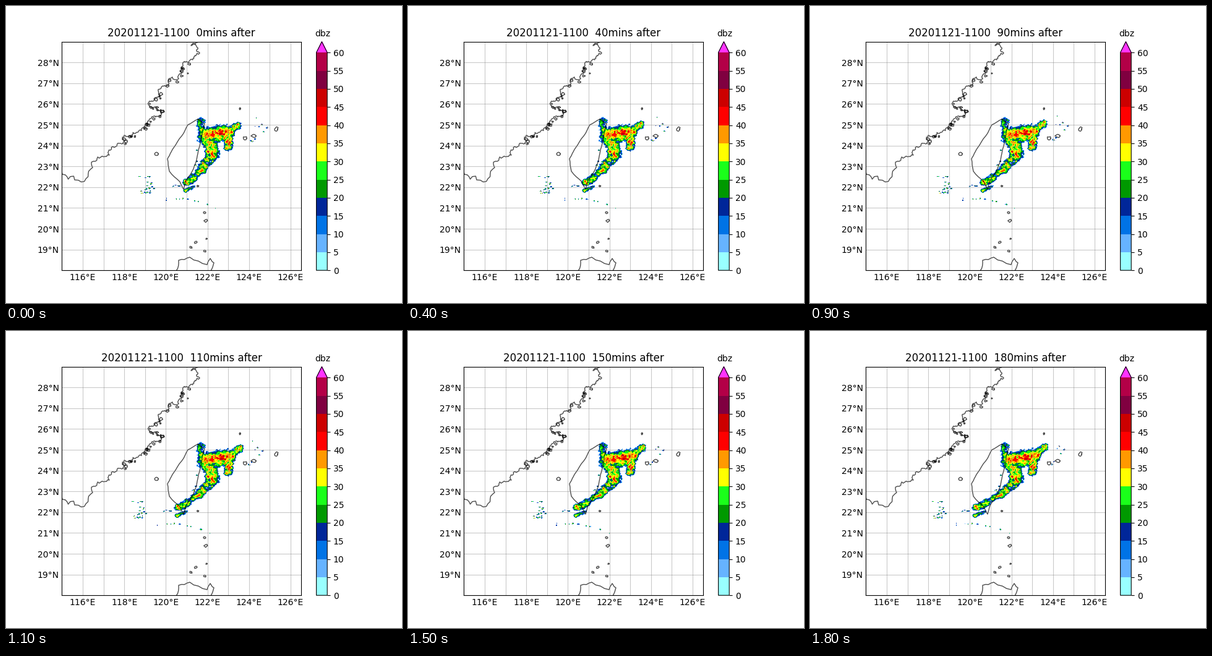
A matplotlib script that plays this animation: 640 by 480 pixels, repeating every 1.9 s.

```python
import numpy as np
import matplotlib.pyplot as plt
from matplotlib.animation import FuncAnimation
from matplotlib.cm import ScalarMappable
from matplotlib.colors import BoundaryNorm, ListedColormap

STEPS = 19
LEFT, RIGHT, TOP, BOTTOM, DEG = 90.4, 476.8, 57.6, 427.2, 33.6
X0, Y0, W, H = 180, 150, 270, 180
LEVELS = list(range(0, 61, 5))
COLORS = ["#99ffff", "#66b3ff", "#0073e6", "#002699", "#009900", "#1aff1a",
          "#ffff00", "#ff9900", "#ff0000", "#cc0000", "#800040", "#b30047"]

plt.rcParams["font.family"] = "DejaVu Sans"
rng = np.random.default_rng(11)

# Key points of the coasts, in stage pixels
MAINLAND = [(90, 267), (140, 261), (167, 241), (187, 223), (191, 209),
            (213, 204), (229, 186), (251, 176), (243, 163), (231, 155),
            (248, 147), (246, 135), (262, 123), (283, 100), (299, 86),
            (313, 76), (299, 64), (313, 57)]
MAIN_ISLAND = [(310, 183), (294, 192), (284, 210), (271, 229), (264, 242),
               (261, 247), (264, 267), (281, 284), (287, 296), (291, 282),
               (303, 263), (309, 243), (314, 222), (317, 203), (321, 190),
               (310, 183)]
SOUTH = [(275, 428), (279, 411), (297, 406), (325, 418), (330, 408),
         (336, 415), (331, 428)]
# x, y, radius
ISLANDS = [(310, 291, 1.5), (243, 239, 2.8), (321, 334, 2), (323, 347, 2.8),
           (324, 376, 1.2), (307, 382, 2.5), (299, 390, 2), (321, 396, 2.3),
           (386, 214, 3.3), (400, 210, 3.5), (437, 199, 3.3), (378, 166, 1.5),
           (294, 109, 1), (296, 94, 2)]

# Rain bands: x1, y1, x2, y2, half width, strength
BANDS = [(315, 187, 315, 214, 8, 22), (323, 209, 356, 205, 15, 36),
         (327, 207, 352, 207, 6, 41), (354, 202, 375, 194, 7, 29),
         (361, 202, 359, 229, 8, 32), (329, 224, 335, 240, 12, 33),
         (333, 240, 318, 262, 10, 28), (317, 262, 300, 281, 7, 24),
         (304, 279, 292, 285, 7, 30), (302, 293, 290, 298, 4, 23)]
# Loose specks: x, y, spread x, spread y, count
SPECKS = [(233, 292, 4, 4, 14), (222, 301, 5, 1.5, 6), (226, 275, 4, 1.5, 4),
          (275, 291, 4, 1, 6), (272, 312, 10, 1, 6), (335, 315, 16, 6, 4),
          (401, 216, 3, 1.5, 4), (407, 190, 3, 4, 4), (421, 205, 3, 6, 3),
          (309, 251, 3, 8, 5)]


def lon_x(lon):
    return LEFT + DEG * (lon - 115)


def lat_y(lat):
    return BOTTOM - DEG * (lat - 18)


def roughen(points, amount, depth):
    """Break each segment by pushing its middle sideways."""
    pts = np.array(points, float)
    for _ in range(depth):
        step = np.diff(pts, axis=0)
        side = step[:, ::-1] * (-1, 1)
        push = rng.uniform(-amount, amount, (len(step), 1))
        out = np.empty((2 * len(pts) - 1, 2))
        out[::2] = pts
        out[1::2] = pts[:-1] + step / 2 + side * push
        pts = out
    return pts


def islet(x, y, radius):
    a = np.linspace(0, 2 * np.pi, 9)
    r = radius * rng.uniform(0.5, 1.2, 9)
    r[-1] = r[0]
    return np.column_stack([x + r * np.cos(a), y + r * np.sin(a)])


def make_coasts():
    main = roughen(MAINLAND, 0.38, 4)
    lines = [main, roughen(MAIN_ISLAND, 0.04, 2), roughen(SOUTH, 0.1, 2)]
    lines += [islet(*i) for i in ISLANDS]
    # Skerries just off the northern half of the mainland
    for x, y in main[rng.integers(50, 210, 34)]:
        lines.append(islet(x + rng.uniform(0, 4), y + rng.uniform(0, 4),
                           rng.uniform(1, 3)))
    return lines


xx, yy = np.meshgrid(X0 + 0.5 + np.arange(W), Y0 + 0.5 + np.arange(H))


def noise(cell):
    """Smooth random field with bumps of about one cell."""
    gx, gy = (xx - X0) / cell, (yy - Y0) / cell
    grid = rng.standard_normal((int(H / cell) + 3, int(W / cell) + 3))
    i, j = gy.astype(int), gx.astype(int)
    fy, fx = gy - i, gx - j
    upper = grid[i, j] * (1 - fx) + grid[i, j + 1] * fx
    lower = grid[i + 1, j] * (1 - fx) + grid[i + 1, j + 1] * fx
    return upper * (1 - fy) + lower * fy


def band(x1, y1, x2, y2, width, strength):
    dx, dy = x2 - x1, y2 - y1
    along = ((xx - x1) * dx + (yy - y1) * dy) / (dx * dx + dy * dy)
    along = np.clip(along, 0, 1)
    gap = np.hypot(xx - x1 - along * dx, yy - y1 - along * dy)
    return strength * (1.05 - (gap / width) ** 2.5)


def make_echo():
    bands = np.max([band(*b) for b in BANDS], axis=0)
    field = bands + 7 * noise(2.3) + 6 * noise(5) + 3 * noise(1)
    for x, y, sx, sy, count in SPECKS:
        for _ in range(count):
            px, py = rng.normal((x, y), (sx, sy))
            rx, ry = rng.uniform(0.8, 2.4), rng.uniform(0.7, 1.5)
            q = np.hypot((xx - px) / rx, (yy - py) / ry)
            field = np.maximum(field, rng.uniform(17, 34) * (1.1 - q ** 2))
    return field


def sigmoid(v):
    return 1 / (1 + np.exp(-v))


def make_flow():
    """Drift over the whole loop: west in the south, a lifting eastern hook."""
    south = sigmoid((yy - 262) / 8 + (290 - xx) / 40)
    east = sigmoid((xx - 391) / 3)
    hook = np.exp(-((xx - 376) ** 2 + (yy - 188) ** 2) / 200)
    stretch = np.exp(-((xx - 340) / 20) ** 2 - ((yy - 207) / 12) ** 2)
    flow_x = (-(25 - 0.13 * abs(xx - 255)) * south * (1 - east)
              - 11 * east + 9 * hook + 0.35 * (xx - 340) * stretch)
    return flow_x, -5 * east - 8 * hook


echo = make_echo()
flow_x, flow_y = make_flow()


def echo_at(t):
    col = np.clip(np.floor(xx - flow_x * t - X0), 0, W - 1).astype(int)
    row = np.clip(np.floor(yy - flow_y * t - Y0), 0, H - 1).astype(int)
    return np.ma.masked_less(echo[row, col], 8)


fig = plt.figure(figsize=(6.4, 4.8), dpi=100)
ax = fig.add_axes([LEFT / 640, 0.11, (RIGHT - LEFT) / 640, 0.77])
cmap = ListedColormap(COLORS)
cmap.set_over("#ff33ff")
cmap.set_bad((1, 1, 1, 0))
norm = BoundaryNorm(LEVELS, len(COLORS))

radar = ax.imshow(echo_at(0), cmap=cmap, norm=norm, interpolation="nearest",
                  extent=(X0, X0 + W, Y0 + H, Y0), aspect="auto", zorder=1)
for line in make_coasts():
    ax.plot(*line.T, color="black", alpha=0.7, lw=1, zorder=1.5)

for lon in range(116, 127):
    ax.axvline(lon_x(lon), color="gray", alpha=0.42, lw=0.8, zorder=2)
for lat in range(19, 29):
    ax.axhline(lat_y(lat), color="gray", alpha=0.42, lw=0.8, zorder=2)

lons, lats = range(116, 127, 2), range(19, 29)
ax.set_xticks([lon_x(v) for v in lons], [f"{v}°E" for v in lons])
ax.set_yticks([lat_y(v) for v in lats], [f"{v}°N" for v in lats])
ax.tick_params(length=0)
ax.set_xlim(LEFT, RIGHT)
ax.set_ylim(BOTTOM, TOP)
title = ax.set_title("")

cax = fig.add_axes([501.6 / 640, 0.11, 17.6 / 640, 0.77])
fig.colorbar(ScalarMappable(norm, cmap), cax=cax, extend="max", ticks=LEVELS)
fig.text(512 / 640, 1 - 49.3 / 480, "dbz", ha="center", fontsize=10)


def draw(i):
    radar.set_data(echo_at(i / (STEPS - 1)))
    title.set_text(f"20201121-1100  {10 * i}mins after")
    return radar, title


anim = FuncAnimation(fig, draw, frames=STEPS, interval=100, repeat=True)
plt.show()
```
